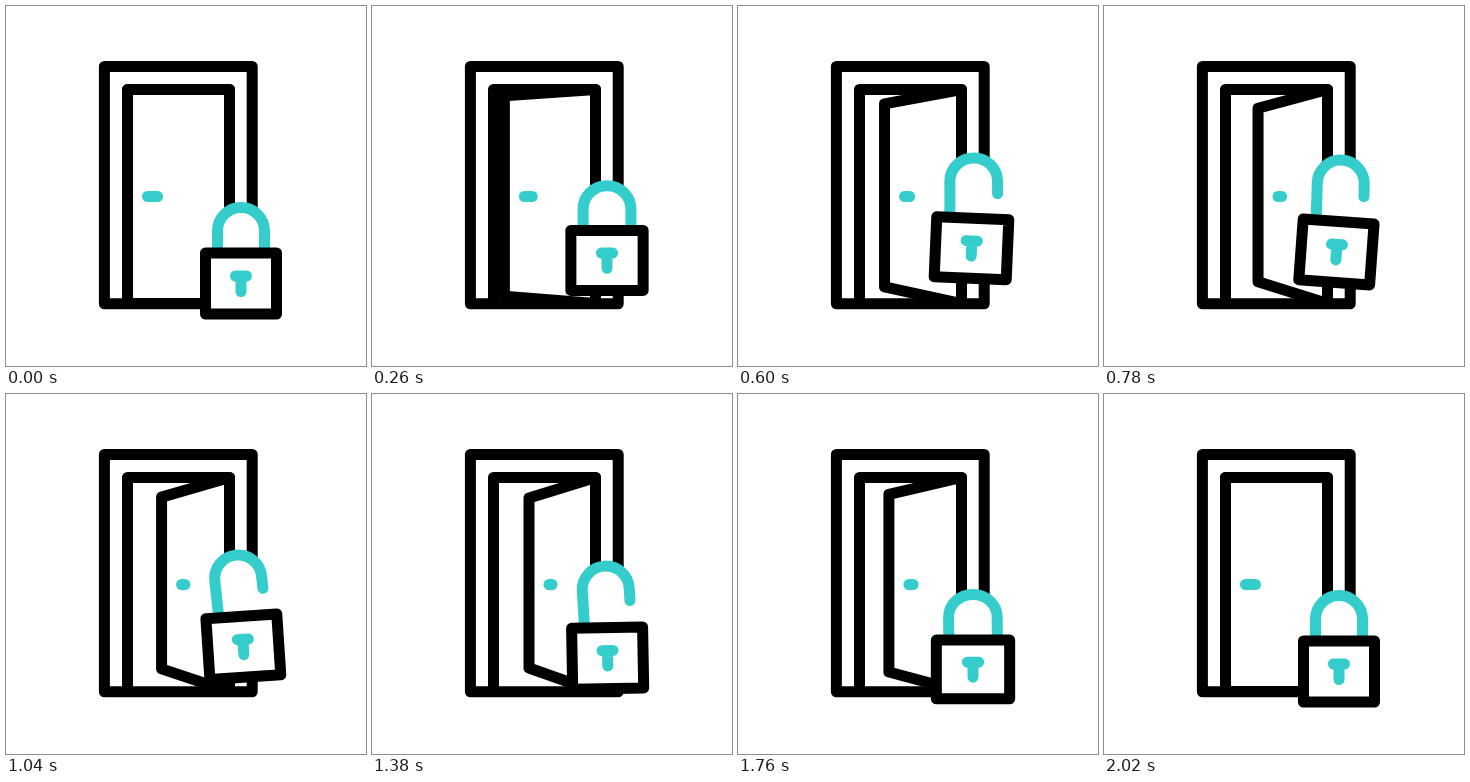
Animation of 360x360 px, one loop 2400 ms. Source, as an HTML page without scripts:

```html
<!DOCTYPE html>
<html lang="en">
<head>
<meta charset="utf-8">
<title>Door and padlock</title>
<style>
  html, body { margin: 0; width: 100%; height: 100%; overflow: hidden; background: #fff; }
  svg { display: block; width: 100vw; height: 100vh; }
  .line {
    fill: none; stroke: #000; stroke-width: 11;
    stroke-linecap: round; stroke-linejoin: round;
    vector-effect: non-scaling-stroke;
  }
  .teal { stroke: #34cdcc; }
  .white { fill: #fff; }

  .door, .handle, .shackle, .hoop { animation: 2.4s linear infinite; }
  .door { animation-name: door; }
  .handle { animation-name: handle; }
  .shackle { animation-name: raise; transform-origin: 235px 240px; }
  .hoop { animation-name: leg; }
  .shackle, .hoop { animation-timing-function: ease-in-out; }
  .lock {
    transform-origin: 235px 242px;
    animation: float 2.4s infinite, swing 2.4s ease-in-out infinite, squash 2.4s linear infinite;
  }

  /* door: swings ajar, drifts wide, shuts */
  @keyframes door {
    0%, 84.2%, 100% { d: path("M223.5 83.5L121.5 83.5L121.5 297.5L223.5 297.5Z"); }
    33% { d: path("M223.5 83.5L154.5 102.5L154.5 275.5L223.5 297.5Z"); }
    57%, 69% {
      d: path("M223.5 83.5L157 104L157 274L223.5 297.5Z");
      animation-timing-function: ease-in-out;
    }
  }
  @keyframes handle {
    0%, 84.2%, 100% { d: path("M141.5 190.5L151.5 190.5"); }
    33% { d: path("M174.5 190.5L178 190.5"); }
    57%, 69% {
      d: path("M177 190.5L180 190.5");
      animation-timing-function: ease-in-out;
    }
  }

  /* padlock: rises, pops open, sinks back */
  @keyframes float {
    0% { translate: 0 0; animation-timing-function: ease-in-out; }
    19% { translate: 0 -36px; animation-timing-function: cubic-bezier(.35, .06, .75, .75); }
    74.5%, 100% { translate: 0 0; }
  }
  @keyframes swing {
    0%, 18%, 70%, 100% { rotate: 0deg; }
    31.5% { rotate: 4.6deg; }
    38.5% { rotate: -5deg; animation-timing-function: ease-out; }
  }
  @keyframes squash {
    0%, 8%, 26%, 66%, 84.2%, 100% { scale: 1 1; }
    21% { scale: 1.08 .92; }
    71% { scale: 1.04 .955; }
  }
  @keyframes raise {
    0%, 16%, 77%, 100% { translate: 0 0; rotate: 0deg; }
    26%, 62% { translate: 0 -16px; rotate: -2.5deg; }
  }
  @keyframes leg {
    0%, 16%, 77%, 100% { d: path("M211.5 265V225a23.5 23.5 0 0 1 47 0V247"); }
    26%, 62% { d: path("M211.5 265V225a23.5 23.5 0 0 1 47 0V237.5"); }
  }
</style>
</head>
<body>
<svg viewBox="0 0 360 360">
  <rect class="line" x="98.4" y="60.5" width="147.8" height="237.3"/>
  <path class="line" d="M121.5 297.5V83.5H223.5V297.5"/>
  <path class="line door" d="M223.5 83.5L121.5 83.5L121.5 297.5L223.5 297.5Z"/>
  <path class="line teal handle" d="M141.5 190.5L151.5 190.5"/>
  <g class="lock">
    <g class="shackle">
      <path class="white" d="M211.5 265V225a23.5 23.5 0 0 1 47 0V265Z"/>
      <path class="line teal hoop" d="M211.5 265V225a23.5 23.5 0 0 1 47 0V247"/>
    </g>
    <path class="white" d="M199.5 247h71v61h-71z"/>
    <path class="line" d="M199.5 247h71v61h-71z"/>
    <path class="line teal" d="M229.5 270H240.5M235 270V285.5"/>
  </g>
</svg>
</body>
</html>
```
